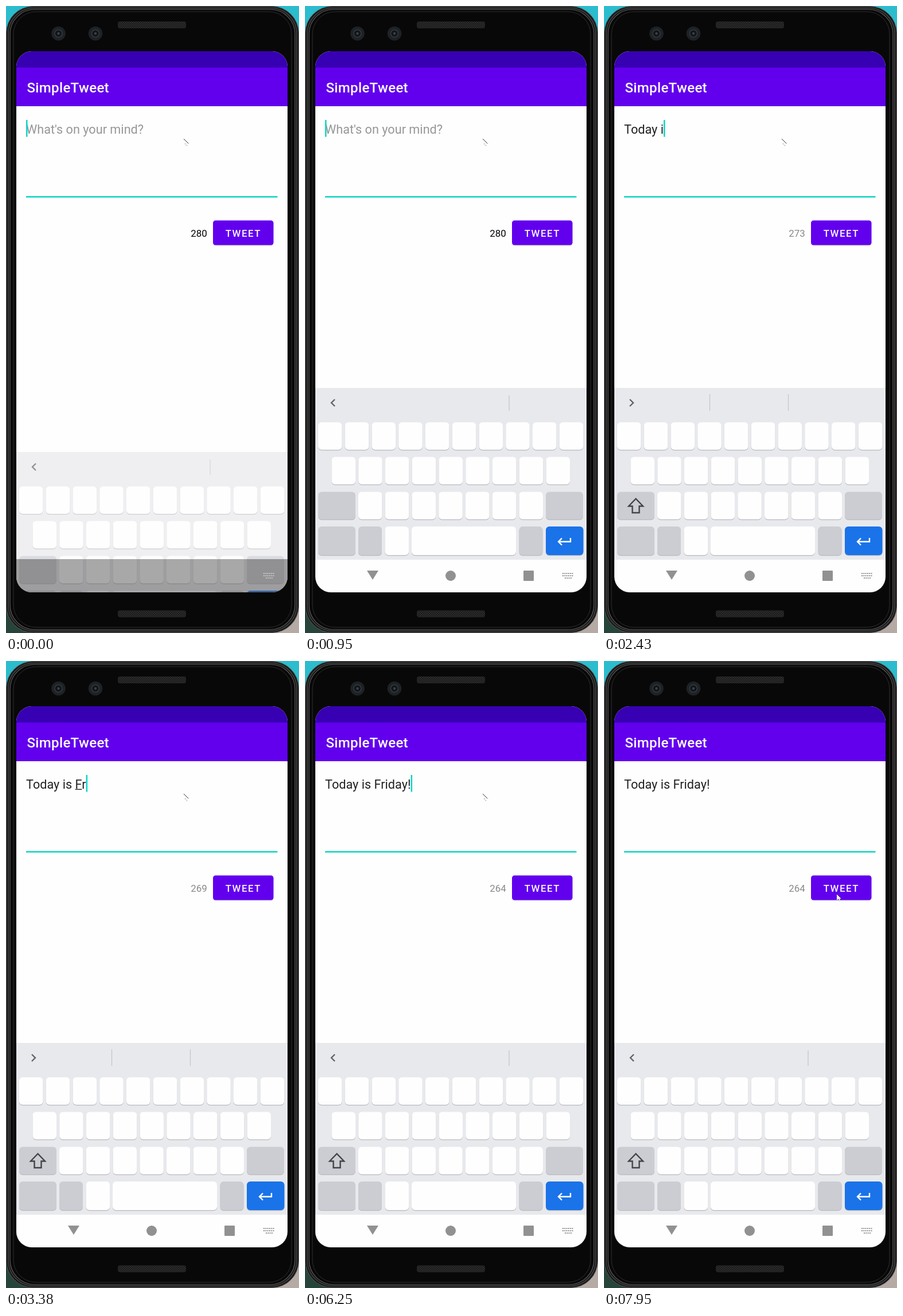
Recreate the animation shown at these times as an HTML page. Size 511 px wide and 1095 px high, loop 8000 ms.

```html
<!DOCTYPE html>
<html lang="en">
<head>
<meta charset="utf-8">
<title>Compose screen</title>
<style>
html, body { margin: 0; width: 100%; height: 100%; overflow: hidden; background: #2bbccd; }
svg { display: block; width: 511px; height: 1095px; }
text { font-family: Roboto, "Liberation Sans", sans-serif; white-space: pre; }
.field { font-size: 21.68px; fill: #212121; }
.hint { fill: #979797; }
.title { font-size: 24.09px; font-weight: 500; letter-spacing: .0125em; fill: #fff; }
.button { font-size: 16.86px; font-weight: 500; letter-spacing: .0893em; fill: #fff; }
.count { font-size: 16.86px; fill: #888; }
.line { fill: none; stroke-width: 2.4; }
</style>
</head>
<body>
<svg viewBox="0 0 511 1095">
  <defs>
    <clipPath id="screen"><rect x="18" y="79" width="473" height="945" rx="27"/></clipPath>
    <pattern id="mesh" width="4" height="4" patternUnits="userSpaceOnUse">
      <rect width="4" height="4" fill="#1b1b1b"/>
      <path d="M0 0h2v2h-2zM2 2h2v2h-2z" fill="#2c2c2c"/>
    </pattern>
  </defs>

  <!-- phone body -->
  <rect width="511" height="600" fill="#2bbccd"/>
  <rect y="1040" width="255" height="55" fill="#27443a"/>
  <rect x="255" y="1040" width="256" height="55" fill="#b5aaa4"/>
  <rect x=".5" y=".5" width="510" height="1094" rx="47" fill="#161616" stroke="#5d5d5d"/>
  <rect x="4" y="3.5" width="503" height="1088" rx="45" fill="#0c0c0c" stroke="#3b3b3b" stroke-width="2"/>
  <rect x="7" y="6" width="497" height="1083" rx="43" fill="#080808" stroke="#606060" stroke-width="1.2"/>
  <rect x="13" y="10" width="485" height="1075" rx="39" fill="#080808" stroke="#2e2e2e"/>
  <rect x="195" y="27" width="119" height="12" rx="4" fill="url(#mesh)"/>
  <rect x="195" y="1055.500" width="119" height="12" rx="4" fill="url(#mesh)"/>
  <g id="cameras"></g>

  <g clip-path="url(#screen)">
    <rect x="18" y="79" width="473" height="945" fill="#fefefe"/>
    <rect x="18" y="79" width="473" height="29" fill="#3700b3"/>
    <rect x="18" y="107.500" width="473" height="67.500" fill="#6200ee"/>
    <text class="title" x="36.500" y="151">SimpleTweet</text>

    <text id="hint" class="field hint" x="35" y="222.500">What's on your mind?</text>
    <text id="typed" class="field" x="35" y="222.500"></text>
    <rect id="under" y="223.500" height="1.400" fill="#212121"/>
    <rect id="caret" y="199" width="2.500" height="29.500" fill="#0bd6c3"/>
    <rect x="35" y="332" width="438.500" height="2.500" fill="#0bd6c3"/>
    <text id="count" class="count" x="322.300" y="403"></text>
    <rect x="361" y="375.500" width="105.500" height="43" rx="4.500" fill="#d2d2d6"/>
    <rect x="361" y="374.500" width="105.500" height="43" rx="4.500" fill="#6200ee"/>
    <text class="button" x="382.700" y="402.500">TWEET</text>

    <g id="nav" fill="#919191">
      <path id="back"/>
      <circle cx="254" cy="995" r="9"/>
      <rect x="381" y="986" width="18" height="18" rx="1"/>
    </g>
    <g id="board">
      <rect x="18" y="667" width="473" height="300" fill="#e8e9ed"/>
      <path id="chevron" class="line" stroke="#626367"/>
      <path id="dividers" fill="none" stroke="#c6c7ca" stroke-width="1.300"/>
      <g id="keys"></g>
      <path id="shift" class="line" stroke="#434448" d="M55.500 860.500L43 873.500h6.500v11.500h12v-11.500h6.500z"/>
      <path class="line" stroke="#fff" d="M463 929v6.500h-21m6-6l-6 6 6 6"/>
    </g>
    <rect id="shade" x="18" y="966" width="473" height="58" opacity=".34"/>
    <path id="imeIcon" fill="none" stroke-width="2" stroke-dasharray="2 1.300" d="M449 991h19M449 995h19M453 999h12"/>
  </g>

  <g id="mouse">
    <path fill="#fff" d="M0 0v11l2.700-2.500 2 4.500 2-1-2-4H8.500z"/>
    <path fill="none" stroke="#333" d="M0 0l8.300 8.300"/>
    <path fill="none" stroke="#999" stroke-dasharray="1.500 1" d="M1.500 9l1.500-1 2 4.500 1.500-1"/>
  </g>
</svg>
<script>
const LOOP = 8000;
const $ = id => document.getElementById(id);
const show = (id, on) => $(id).setAttribute('visibility', on ? 'visible' : 'hidden');
const set = (id, attr, value) => $(id).setAttribute(attr, value);

// [time, text, underlined letters of the last word]
const typing = [
  [0, '', 0],
  [1170, 'T', 0], [1410, 'To', 1], [1530, 'Tod', 2], [1650, 'Tod', 3], [1760, 'Toda', 3],
  [1910, 'Today', 4], [2070, 'Today', 5], [2230, 'Today ', 0], [2390, 'Today i', 0], [2550, 'Today is', 1],
  [2820, 'Today is', 2], [3000, 'Today is ', 0], [3200, 'Today is F', 0], [3380, 'Today is Fr', 1],
  [3630, 'Today is Fri', 2], [3750, 'Today is Fri', 3], [4050, 'Today is Fr', 2],
  [5000, 'Today is Fri', 2], [5140, 'Today is Frid', 3], [5280, 'Today is Frida', 4],
  [5420, 'Today is Friday', 5], [5690, 'Today is Friday', 6], [6130, 'Today is Friday!', 0]
];
const caretOff = [[240, 800], [4720, 5000], [6650, 7150], [7650, LOOP]];
// [time, x, y] of the pointer tip
const pointer = [
  [0, 310, 232], [6550, 320, 250], [6790, 346, 297], [6930, 372, 345],
  [7040, 392, 380], [7290, 404, 398], [7530, 409, 404], [7800, 407, 406], [7950, 406, 407]
];
const at = (steps, t) => steps.findLast(s => s[0] <= t);

function key(x, y, w = 41.5, fill = '#fefefe', h = 48) {
  const box = (dy, color) =>
    `<rect x="${x}" y="${y + dy}" width="${w}" height="${h}" rx="6" fill="${color}"/>`;
  return box(1.2, '#b9babe') + box(0, fill);
}

function buildKeys() {
  const pitch = 46.75, grey = '#cccdd2';
  const row = (n, x, y) => Array.from({ length: n }, (_, i) => key(x + i * pitch, y)).join('');
  $('keys').innerHTML =
    row(10, 23, 727) + row(9, 46.5, 787.5) + row(7, 93, 848.5) +
    key(23, 848.5, 65, grey) + key(420, 848.5, 65, grey) +
    key(23, 909, 65, grey, 50) + key(93, 909, 41, grey, 50) +
    key(139.5, 909, 41.5, '#fefefe', 50) + key(186, 909, 182, '#fefefe', 50) +
    key(373.5, 909, 41, grey, 50) + key(420, 909, 65.5, '#1a73e8', 50);
}

function buildCameras() {
  $('cameras').innerHTML = [91.5, 156].map(x =>
    `<circle cx="${x}" cy="48" r="12.3" fill="#1e2226"/>
     <circle cx="${x}" cy="48" r="6.5" fill="#121518" stroke="#343a3f" stroke-width="1.5"/>
     <circle cx="${x}" cy="48" r="2.2" fill="#3a4147"/>`).join('');
}

function drawField(t) {
  const [, text, marked] = at(typing, t);
  const typed = $('typed');
  typed.textContent = text;
  const width = n => n ? typed.getSubStringLength(0, n) : 0;
  const start = text.lastIndexOf(' ') + 1;
  const left = width(start);
  set('under', 'x', 35 + left);
  set('under', 'width', width(start + marked) - left);
  set('caret', 'x', 35 + width(text.length));
  show('hint', !text);
  show('caret', !caretOff.some(([a, b]) => t >= a && t < b));
  $('count').textContent = 280 - text.length;
  $('count').style.fill = text ? '' : '#000';
}

function drawKeyboard(t) {
  const entering = t < 120, settled = t >= 240;
  const suggesting = t >= 1290 && t < 6250;
  set('board', 'transform', `translate(0 ${entering ? 112 : settled ? 0 : 2})`);
  set('board', 'opacity', entering ? .7 : 1);
  show('shade', entering);
  show('nav', !entering);
  set('imeIcon', 'stroke', entering ? '#c4c4c4' : '#919191');
  set('back', 'd', settled ? 'M108 986h20l-10 16z' : 'M113 983l17 10-17 9.500z');
  show('shift', t >= 1290);
  set('chevron', 'd', suggesting ? 'M45 687l6 6-6 6' : 'M52 687l-6 6 6 6');
  set('dividers', 'd', suggesting ? 'M184.500 678v29M321.500 678v29' : 'M356 680v27');
}

function draw(t) {
  drawField(t);
  drawKeyboard(t);
  const [, x, y] = at(pointer, t);
  set('mouse', 'transform', `translate(${x} ${y})`);
}

buildKeys();
buildCameras();
const begin = performance.now();
function tick() {
  draw((performance.now() - begin) % LOOP);
  requestAnimationFrame(tick);
}
tick();
</script>
</body>
</html>
```
